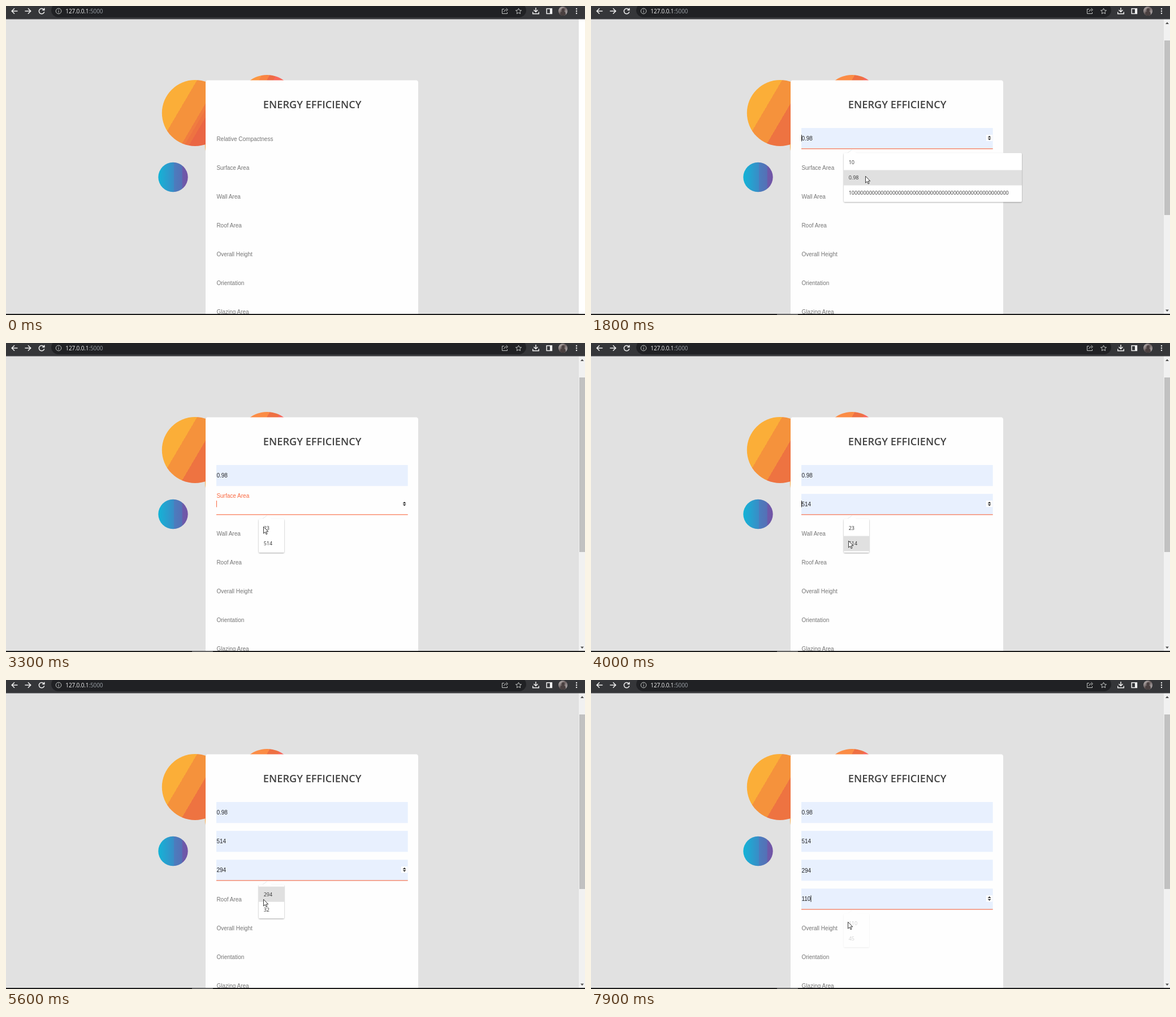
An HTML page that plays this animation: 1024 by 547 pixels, repeating every 8000 ms.

```html
<!DOCTYPE html>
<html lang="en">
<head>
<meta charset="utf-8">
<title>Energy efficiency form</title>
<style>
html, body { margin: 0; width: 100%; height: 100%; overflow: hidden; background: #e1e1e1; }
svg { display: block; width: 100vw; height: 100vh; }
.ui { font-family: "Open Sans", "Noto Sans", sans-serif; }
.form { font: 10px "Liberation Sans", Arial, sans-serif; }
.icon { fill: none; stroke: #f1f1f1; stroke-width: 1.5; }
.soft { stroke: #c4c7c5; stroke-width: 1; }
</style>
</head>
<body>
<svg id="stage" viewBox="0 0 1024 547" preserveAspectRatio="none">
  <defs>
    <linearGradient id="blue">
      <stop offset="0" stop-color="#12b3d6"/><stop offset=".16" stop-color="#1fa8d2"/>
      <stop offset=".53" stop-color="#3a8cc6"/><stop offset=".53" stop-color="#4b7dbe"/>
      <stop offset=".8" stop-color="#5570b6"/><stop offset=".82" stop-color="#6b5bab"/>
      <stop offset="1" stop-color="#7354a5"/>
    </linearGradient>
    <linearGradient id="photo" x2="1" y2="1">
      <stop offset="0" stop-color="#d4cfce"/><stop offset=".45" stop-color="#6b5f5f"/>
      <stop offset="1" stop-color="#c9c6c8"/>
    </linearGradient>
    <filter id="shadow" x="-20%" y="-20%" width="140%" height="150%">
      <feDropShadow dx="0" dy="1" stdDeviation="1" flood-opacity=".35"/>
    </filter>
    <g id="bands"></g>
  </defs>
  <rect width="1024" height="547" fill="#e1e1e1"/>
  <circle cx="412" cy="246" r="60" fill="#f9a63a"/>
  <circle id="big" cx="334.3" cy="189.5" r="58.5"/>
  <circle id="top" cx="461.5" cy="172.5" r="50.5"/>
  <circle cx="295.5" cy="303" r="26.2" fill="url(#blue)"/>
  <rect x="353" y="131.5" width="376" height="430" rx="4" fill="#fefefe"/>
  <text class="ui" x="541.7" y="181" font-size="18.2" font-weight="600" fill="#424242" text-anchor="middle">ENERGY EFFICIENCY</text>
  <g id="fields" class="form"></g>
  <g id="popup" class="ui" font-size="9" fill="#333"></g>
  <rect x="1013" y="23" width="11" height="523" fill="#fff"/>
  <g id="scrollbar">
    <rect x="1013" y="23" width="11" height="523" fill="#f1f1f1"/>
    <rect x="1014" y="61" width="10" height="309" fill="#c1c1c1"/>
    <path d="M1016 32h6l-3-3.5zM1016 537.5h6l-3 3.5z" fill="#505050"/>
  </g>
  <rect y="545" width="1024" height="2" fill="#1b1b1b"/>
  <rect id="taskbar" x="329" y="545.5" width="37" height="1.5" fill="#777"/>

  <rect width="1024" height="23" fill="#353639"/>
  <rect y="22.5" width="1024" height="1" fill="#4a4b4e"/>
  <rect x="80" y="-5" width="840" height="25" rx="12.5" fill="#202124"/>
  <g class="icon">
    <path d="M20.500 9H10.500M15 4.200L10.200 9l4.800 4.800M33.500 9h10M39 4.200L43.800 9 39 13.800"/>
    <path d="M67 6.500a4.700 4.700 0 1 0 .7 3.600M67.800 3.800v3.400h-3.600"/>
    <path d="M937 3v7M933.500 7l3.500 3.500L940.500 7M931.700 10.500v3.300h10.600v-3.300"/>
    <path d="M956.200 4.700h9.200v8.700h-9.200z"/>
    <path d="M963.700 4.700v8.700" stroke-width="3.500"/>
  </g>
  <g class="icon soft">
    <circle cx="93" cy="9" r="4.800"/>
    <path d="M93 8.300v3.500M93 6v1.200"/>
    <path d="M881 5.500h-3.500v8h9v-2.500M880.500 10.500q.5-4 5-4M884.500 4l3 2.700-3 2.700"/>
    <path d="M906.500 4.200l1.500 3.200 3.500.4-2.600 2.400.7 3.500-3.100-1.800-3.100 1.800.7-3.500-2.600-2.400 3.500-.4z"/>
  </g>
  <text class="ui" x="105.300" y="12.800" font-size="10" letter-spacing="-.13" fill="#f1f1f1">127.0.0.1<tspan fill="#9aa0a6">:5000</tspan></text>
  <circle cx="985" cy="9" r="8" fill="url(#photo)"/>
  <path d="M980 15.300q0-5 3.500-6a2.800 2.800 0 1 1 3.500 0q3 1 3 6a8 8 0 0 1-10 0z" fill="#4a4040"/>
  <g fill="#f1f1f1"><circle cx="1009" cy="5" r="1.200"/><circle cx="1009" cy="9" r="1.200"/><circle cx="1009" cy="13" r="1.200"/></g>
  <path id="cursor" d="M.5.300v11.800l2.800-2.500 1.900 4.200 1.800-.8-1.900-4.100h3.700z" fill="#fff" stroke="#222" stroke-width=".9"/>
</svg>
<script>
const LOOP = 8000, STEP = 100, ROW = 51.1, ORANGE = '#f9673f';
const $ = id => document.getElementById(id);

const labels = ['Relative Compactness', 'Surface Area', 'Wall Area', 'Roof Area',
  'Overall Height', 'Orientation', 'Glazing Area'];

// focus, popup opening, first hover, optional second hover, selection
const inputs = [
  { focus: 800, open: 1200, hover: 1500, next: 1800, pick: 2300, width: 315,
    options: ['10', '0.98', '1' + '0'.repeat(54)] },
  { focus: 2700, open: 3000, hover: 3400, next: 3700, pick: 4300, width: 45, options: ['23', '514'] },
  { focus: 4700, open: 5000, hover: 5400, pick: 6000, width: 45, options: ['294', '32'] },
  { focus: 6500, open: 6800, hover: 7100, pick: 7800, width: 45, options: ['110', '45'] },
];
inputs.forEach((f, i) => f.blur = i < 3 ? inputs[i + 1].focus + 300 : LOOP);
inputs[0].blur = 2900;

const carets = [[1400, 1900], [2300, 2700], [3000, 3500], [4000, 4700],
  [5200, 5600], [6000, 6400], [6900, 7400], [7800, 8000]];

// pointer runs: each is a list of [time, x, y]; hidden between runs
const runs = [
  [[100, 13, 0], [200, 250, 95], [300, 427, 163], [500, 427, 163], [600, 432, 190], [700, 432, 190]],
  [[1400, 470, 262], [1600, 482, 284], [1800, 485, 301], [2300, 485, 301], [2500, 478, 288]],
  [[3300, 455, 325], [3500, 455, 336], [3700, 455, 350], [4300, 455, 350], [4600, 452, 363]],
  [[5200, 452, 368], [5600, 455, 388], [6000, 455, 388], [6200, 453, 388]],
  [[7100, 454, 423], [7200, 454, 428], [8000, 454, 428]],
];

// hard-edged diagonal gradient; bands are [start in px along the axis, colour]
function bandGradient(id, bands) {
  const stops = bands.flatMap(([at, color], i) => {
    const end = i + 1 < bands.length ? bands[i + 1][0] : 1000;
    return [at, end].map(p => `<stop offset="${p / 1000}" stop-color="${color}"/>`);
  });
  return `<linearGradient id="${id}" gradientUnits="userSpaceOnUse" x1="0" y1="0" x2="862" y2="507">${stops.join('')}</linearGradient>`;
}
$('bands').innerHTML =
  bandGradient('bigA', [[0, '#fbae38'], [357.8, '#f5923c'], [391.7, '#f07c40'], [397, '#ee7341'], [404, '#ea6644']]) +
  bandGradient('bigB', [[0, '#fbae38'], [357.8, '#f5923c'], [391.7, '#ee7341']]) +
  bandGradient('topA', [[0, '#fb9640'], [452, '#f98443'], [464, '#ee6b45'], [474, '#f8685a']]) +
  bandGradient('topB', [[0, '#fb8c45'], [464, '#ee7043'], [481, '#f8665c']]);

const rect = (x, y, w, h, fill, extra = '') =>
  `<rect x="${x}" y="${y}" width="${w}" height="${h}" fill="${fill}" ${extra}/>`;
const text = (x, y, s, fill) => `<text x="${x}" y="${y}" fill="${fill}">${s}</text>`;
const rowAt = (f, t) => t < f.hover ? -1 : f.next && t >= f.next ? 1 : 0;

function drawField(label, i, t) {
  const f = inputs[i], dy = i * ROW;
  if (!f || t < f.focus) return text(372.4, 238.5 + dy, label, '#757575');
  const row = rowAt(f, t), focused = t < f.blur, filled = row >= 0;
  let out = '';
  if (filled) {
    out += rect(372, 216 + dy, 338.7, 37.2, '#e8f0fe');
    out += text(372.4, (focused ? 237.5 : 238.3) + dy, f.options[row], '#222');
  } else {
    const rise = Math.min(1, (t - f.focus + 100) / 200);
    out += text(372.4, 238.5 - 15.5 * rise + dy, label, ORANGE);
  }
  if (focused) {
    out += rect(372, 252.2 + dy, 338.7, 1.1, ORANGE);
    if (filled) out += rect(699, 228 + dy, 11, 11, '#fff');
    out += `<path transform="translate(704.6 ${233.6 + dy})" d="M-3-.8h6l-3-3zM-3 .8h6l-3 3z" fill="#333"/>`;
  }
  const last = i === 3 || t < inputs[i + 1].focus;
  if (last && carets.some(([a, b]) => t >= a && t < b)) {
    const x = t >= f.pick ? 372.4 + f.options[row].replace('.', '').length * 5.56 - .6 : 372;
    out += rect(x, 228 + dy, 1, 11.5, filled ? '#222' : ORANGE);
  }
  return out;
}

function drawPopup(f, i, t) {
  if (t < f.open || t >= f.pick + 200) return '';
  const y = 260.3 + i * ROW, h = 27 * f.options.length + 5.5;
  const opacity = t < f.pick ? 1 : t < f.pick + STEP ? .6 : .22;
  let out = rect(447, y, f.width, h, '#fff', 'rx="2" filter="url(#shadow)"');
  out += `<path d="M453 ${y + .5}l8.500-6 8.500 6z" fill="#fff"/><path d="M454 ${y - .5}l7.500-5.300" stroke="#ddd" stroke-width=".7"/>`;
  const row = t < f.pick ? rowAt(f, t) : -1;
  if (row >= 0) out += rect(447, y + 30.2 + 27 * (row - 1), f.width, 27, '#e0e0e0');
  f.options.forEach((s, n) => out += text(455.7, y + 20 + 27 * n, s, '#333'));
  return `<g opacity="${opacity}">${out}</g>`;
}

function drawTooltip(t) {
  if (t < 6500 || t >= 6800) return '';
  return rect(450.5, 404.5, 103, 18, '#fff', 'stroke="#555"') +
    `<text x="456" y="416.800" font-size="8.800" letter-spacing="-.16" fill="#555">Please fill out this field.</text>`;
}

function moveCursor(t) {
  const run = runs.find(r => t >= r[0][0] && t < r[r.length - 1][0]);
  $('cursor').style.display = run ? '' : 'none';
  if (!run) return;
  const k = run.findIndex(p => p[0] > t), [t0, x0, y0] = run[k - 1], [t1, x1, y1] = run[k];
  const p = (t - t0) / (t1 - t0);
  $('cursor').setAttribute('transform', `translate(${x0 + (x1 - x0) * p} ${y0 + (y1 - y0) * p})`);
}

function render(t) {
  const set = t < 700 ? 'A' : 'B';
  $('big').setAttribute('fill', `url(#big${set})`);
  $('top').setAttribute('fill', `url(#top${set})`);
  const scrolled = t >= 1200;
  $('scrollbar').style.display = $('taskbar').style.display = scrolled ? '' : 'none';
  $('fields').innerHTML = labels.map((s, i) => drawField(s, i, t)).join('');
  $('popup').innerHTML = inputs.map((f, i) => drawPopup(f, i, t)).join('') + drawTooltip(t);
  moveCursor(t);
}

const start = performance.now();
let shown = -1;
function tick() {
  const t = Math.floor((performance.now() - start) % LOOP / STEP) * STEP;
  if (t !== shown) render(shown = t);
  requestAnimationFrame(tick);
}
tick();
</script>
</body>
</html>
```
